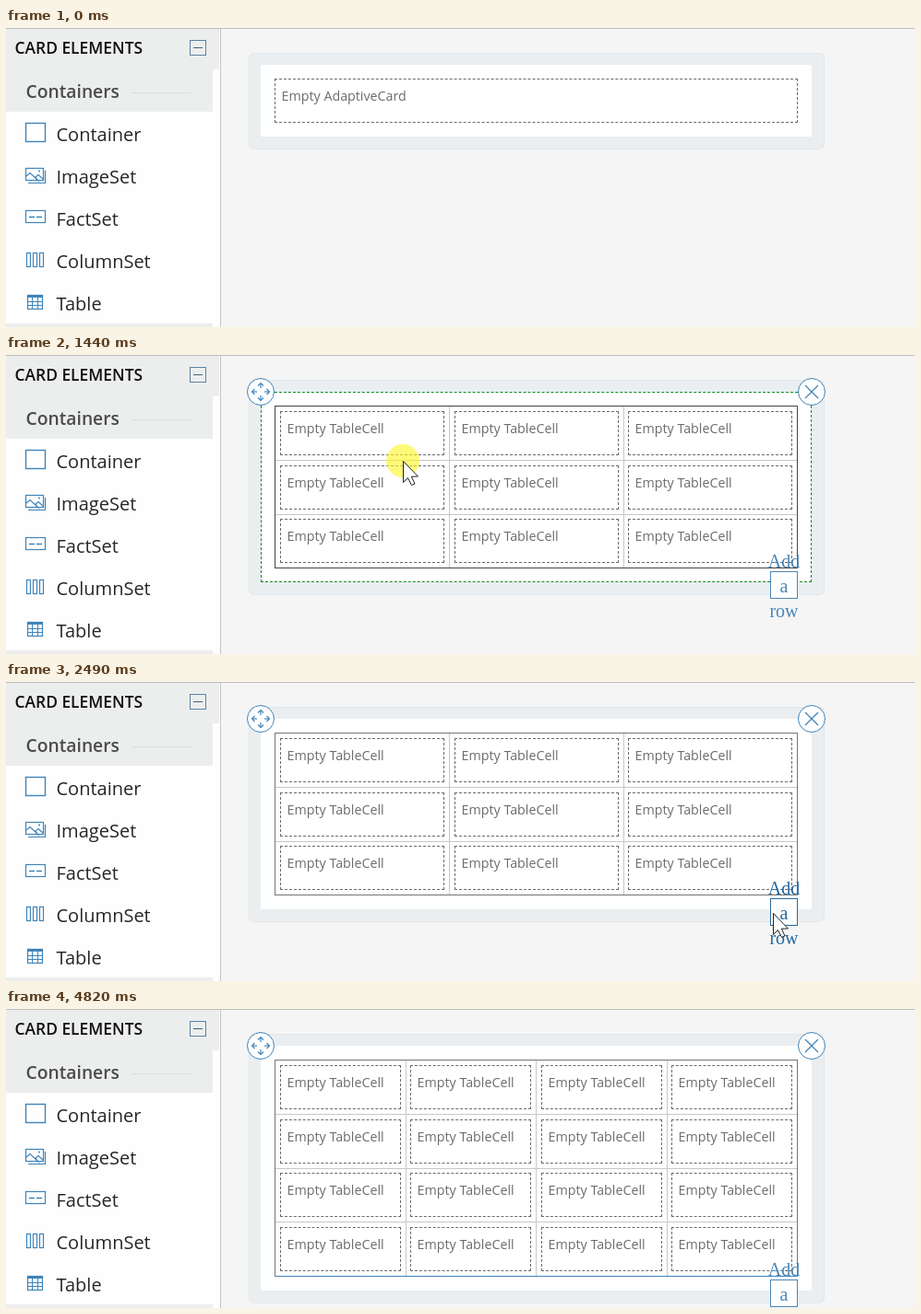
Animation of 985x325 px, one loop 5350 ms. Source, as an HTML page with a canvas:

```html
<!DOCTYPE html>
<html lang="en">
<head>
<meta charset="utf-8">
<title>Card designer</title>
<style>
  html, body { margin: 0; width: 100%; height: 100%; overflow: hidden; background: #f5f5f5; }
  canvas { display: block; width: 985px; height: 325px; }
</style>
</head>
<body>
<canvas id="stage" width="985" height="325"></canvas>
<script>
const ctx = document.getElementById('stage').getContext('2d');
const LOOP = 5350;
const SANS = '"Open Sans", "Noto Sans", sans-serif';
const SERIF = '"Liberation Serif", "Times New Roman", serif';
const BLUE = '#3f84b9';
const ITEMS = ['Container', 'ImageSet', 'FactSet', 'ColumnSet', 'Table'];

// drawing helpers
function fill(x, y, w, h, color) {
  ctx.fillStyle = color;
  ctx.fillRect(x, y, w, h);
}

function box(x, y, w, h, color, width = 1) {
  ctx.strokeStyle = color;
  ctx.lineWidth = width;
  ctx.strokeRect(x + .5, y + .5, w - 1, h - 1);
}

function line(points, color, width = 1) {
  ctx.strokeStyle = color;
  ctx.lineWidth = width;
  ctx.beginPath();
  points.forEach(([x, y], i) => i ? ctx.lineTo(x, y) : ctx.moveTo(x, y));
  ctx.stroke();
}

// each side starts and ends with a full dash, like a CSS dashed border
function dashedSide(x0, y0, x1, y1, color) {
  const length = x1 - x0 + y1 - y0, dash = 3;
  const count = Math.round((length + 2) / (dash + 2));
  ctx.setLineDash([dash, (length - count * dash) / (count - 1)]);
  line([[x0, y0], [x1, y1]], color);
  ctx.setLineDash([]);
}

function dashedBox(x, y, w, h, color) {
  const right = x + w, bottom = y + h;
  dashedSide(x, y + .5, right, y + .5, color);
  dashedSide(x, bottom - .5, right, bottom - .5, color);
  dashedSide(x + .5, y, x + .5, bottom, color);
  dashedSide(right - .5, y, right - .5, bottom, color);
}

function text(str, x, y, font, color, align = 'left') {
  ctx.font = font;
  ctx.fillStyle = color;
  ctx.textAlign = align;
  ctx.fillText(str, x, y);
}

function disc(x, y, r, color, edge) {
  ctx.beginPath();
  ctx.arc(x, y, r, 0, Math.PI * 2);
  ctx.fillStyle = color;
  ctx.fill();
  if (edge) {
    ctx.strokeStyle = edge;
    ctx.lineWidth = 1;
    ctx.stroke();
  }
}

function at(x, y, draw) {
  ctx.save();
  ctx.translate(x, y);
  draw();
  ctx.restore();
}

function fourWays(draw) {
  for (let i = 0; i < 4; i++) {
    draw();
    ctx.rotate(Math.PI / 2);
  }
}

// palette icons, placed from the top left of each row
const icons = {
  Container() { box(21, 11, 22, 21, BLUE, 1.4); },
  ImageSet() {
    line([[24, 30.5], [42.5, 30.5], [42.5, 17]], BLUE, 1.2);
    box(21, 14, 20, 14, BLUE, 1.2);
    line([[22, 23], [26, 19.5], [34, 27], [32, 24], [35, 21.5], [40, 26]], BLUE, 1.2);
    disc(36, 17.5, 1, BLUE);
  },
  FactSet() {
    box(21, 14, 22, 14, BLUE, 1.2);
    line([[25, 21.5], [31, 21.5]], BLUE, 1.5);
    line([[33, 21.5], [39, 21.5]], BLUE, 1.5);
  },
  ColumnSet() {
    for (const x of [22, 29, 36]) box(x, 14, 5, 16, BLUE, 1.2);
  },
  Table() {
    box(23, 14, 17, 16, BLUE, 1.2);
    fill(23, 14, 17, 3, BLUE);
    for (const y of [21.5, 25.5]) line([[23, y], [40, y]], BLUE);
    for (const x of [28.5, 34.5]) line([[x, 17], [x, 30]], BLUE);
  }
};

function item(name, x, y) {
  at(x, y, () => {
    icons[name]();
    text(name, 54.5, 31, `20px ${SANS}`, '#262626');
  });
}

function sidebar(hover, scrollbar) {
  fill(0, 1, 232, 324, '#fefefe');
  fill(0, 1, 231, 44, '#eceeee');
  fill(0, 45, 224, 46, '#eceeee');
  fill(0, 321, 224, 4, '#ededed');
  fill(232, 1, 1, 324, '#c4c4c4');
  if (hover >= 0) fill(0, 91 + hover * 46, 224, 46, '#eeeeec');
  if (scrollbar) fill(224, 45, 7, 280, '#cbcbcb');
  text('CARD ELEMENTS', 9.5, 27.5, `600 17.4px ${SANS}`, '#101010');
  box(199, 13, 18, 17, '#5b82a6');
  line([[203, 21.5], [213, 21.5]], '#41607c');
  text('Containers', 21.5, 76, `600 19.3px ${SANS}`, '#4b4b4b');
  line([[136, 70.5], [200, 70.5]], '#dcdedf');
  ITEMS.forEach((name, i) => item(name, 0, 92 + i * 46));
}

function card(bottom) {
  ctx.beginPath();
  ctx.roundRect(263.5, 27.5, 623, bottom - 14, 5);
  ctx.fillStyle = '#eaeef1';
  ctx.fill();
  ctx.strokeStyle = '#e2e7ea';
  ctx.lineWidth = 1;
  ctx.stroke();
  fill(276, 40, 597, bottom - 40, '#fff');
}

function emptyBox(x, y, w, label) {
  dashedBox(x, y, w, 48, '#6a6a6a');
  text(label, x + 7.6, y + 24, `14.25px ${SANS}`, '#6c6c6c');
}

function table(rows, cols, dropping) {
  const pitchX = 565.5 / cols, pitchY = 58.6;
  const end = Math.floor(61 + pitchY * rows - 5);
  for (let c = 1; c < cols; c++) {
    const x = Math.floor(292 + pitchX * c) + .5;
    line([[x, 56], [x, end]], '#c8c8c8');
  }
  for (let r = 1; r < rows; r++) {
    const y = Math.round(55.5 + pitchY * r) + .5;
    line([[292, y], [857, y]], '#c8c8c8');
  }
  for (let r = 0; r < rows; r++) {
    for (let c = 0; c < cols; c++) {
      emptyBox(Math.round(297 + pitchX * c), Math.round(61 + pitchY * r),
        Math.round(pitchX - 10.5), 'Empty TableCell');
    }
  }
  box(291, 55, 567, end - 54, dropping ? '#444' : '#747474');
  if (rows > 3) line([[291, end + .5], [858, end + .5]], BLUE);
  return end;
}

function addRow(end, hover) {
  const color = hover ? '#2468a0' : '#4a86b6', font = `20px ${SERIF}`;
  text('Add', 843, end, font, color, 'center');
  fill(828, end + 4, 30, 30, '#fff');
  box(828, end + 4, 30, 30, color);
  text('a', 843, end + 27, font, color, 'center');
  text('row', 843, end + 54, font, color, 'center');
}

function peerButtons() {
  disc(276, 40, 14.5, '#fff', BLUE);
  at(276, 40, () => fourWays(() => {
    line([[0, -4], [0, -9]], BLUE, 1.2);
    line([[-3, -6.5], [0, -9.5], [3, -6.5]], BLUE, 1.2);
  }));
  disc(873, 40, 14.5, '#fff', BLUE);
  line([[866, 33], [880, 47]], BLUE, 1.3);
  line([[880, 33], [866, 47]], BLUE, 1.3);
}

function polygon(points, color, edge) {
  ctx.beginPath();
  points.forEach(p => ctx.lineTo(...p));
  ctx.closePath();
  ctx.fillStyle = color;
  ctx.fill();
  ctx.strokeStyle = edge;
  ctx.lineWidth = 1;
  ctx.stroke();
}

function arrowCursor(x, y) {
  at(x, y, () => polygon(
    [[.5, .5], [.5, 23.5], [5.5, 18.5], [9.5, 26.5], [13, 25], [9.3, 17.2], [16.5, 17]],
    '#fff', '#222'));
}

function moveCursor(x, y) {
  const points = [];
  for (let i = 0; i < 4; i++) {
    const c = [1, 0, -1, 0][i], s = [0, 1, 0, -1][i];
    for (const [px, py] of [[-2.5, -2.5], [-2.5, -10.5], [-7, -10.5], [0, -17],
      [7, -10.5], [2.5, -10.5]]) {
      points.push([px * c - py * s, px * s + py * c]);
    }
  }
  at(x + .5, y + .5, () => polygon(points, 'rgba(255,255,150,.3)', '#5a5a48'));
}

// pointer path: step, x, y, easing into that point
const smooth = u => u * u * (3 - 2 * u);
const easeIn = u => u * u;
const easeOut = u => u * (2 - u);
const linear = u => u;
const PATH = [
  [0, 591, 205, linear], [7, 40, 303, smooth], [9, 40, 303, linear],
  [13, 204, 241, easeIn], [15, 356, 150, linear], [16, 400, 122, linear],
  [19, 430, 115, easeOut], [23, 432, 117, linear], [26, 537, 172, easeIn],
  [31, 831, 251, easeOut]
];

function pointer(step) {
  const i = PATH.findIndex(p => p[0] > step);
  if (i < 0) return PATH[PATH.length - 1].slice(1, 3);
  const [s0, x0, y0] = PATH[i - 1], [s1, x1, y1, ease] = PATH[i];
  const u = ease((step - s0) / (s1 - s0));
  return [x0 + (x1 - x0) * u, y0 + (y1 - y0) * u];
}

function draw(t) {
  const step = Math.floor((t - 118) / 69.3);
  const shown = t >= 130 && t < 3010;
  const [x, y] = shown ? pointer(Math.max(0, step)) : [0, 0];
  const dragging = step >= 9 && step < 16;
  const dropped = step >= 16;
  const dropping = dropped && step < 24;
  const pressed = step >= 7 && step < 24 || t >= 2550 && t < 2820;
  const inPalette = shown && x < 232;
  const hover = inPalette && step >= 8 ? Math.floor((y - 92) / 46) : -1;

  fill(0, 0, 985, 325, '#f5f5f5');
  sidebar(hover, inPalette);
  fill(0, 0, 985, 1, '#bcbcbc');

  if (dropped) {
    const rows = t < 2940 ? 3 : 4, cols = t < 4690 ? 3 : 4;
    const bottom = rows === 3 ? 247 : 306;
    card(bottom);
    if (dropping) dashedBox(276, 40, 597, bottom - 40, '#0a8a1c');
    const end = table(rows, cols, dropping);
    peerButtons();
    addRow(end, t >= 2350 && t < 3010);
  } else {
    card(118);
    emptyBox(291, 55, 567, 'Empty AdaptiveCard');
  }

  if (!shown) return;
  if (dragging) item('Table', x - 58.5, y - 52);
  if (pressed) disc(x, y, 18, 'rgba(255,246,40,.62)');
  (dragging ? moveCursor : arrowCursor)(x, y);
}

const start = performance.now();
function tick() {
  draw((performance.now() - start) % LOOP);
  requestAnimationFrame(tick);
}
tick();
</script>
</body>
</html>
```
